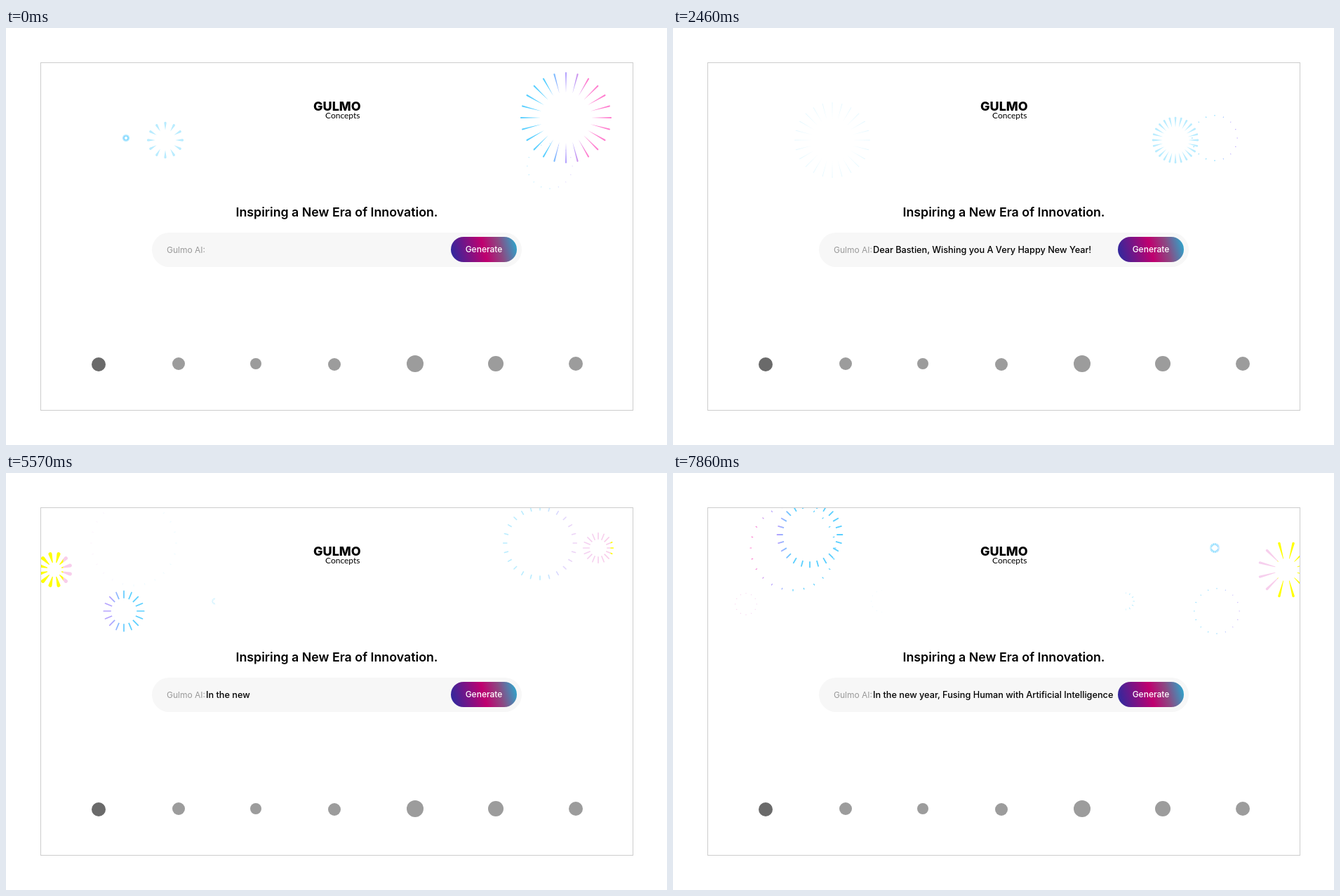
Recreate the animation shown at these times as an HTML page with a canvas. Size 942 by 595 pixels, loop 8000 ms.

```html
<!DOCTYPE html>
<html lang="en">
<head>
<meta charset="utf-8">
<title>Inspiring a New Era of Innovation</title>
<style>
  html, body { margin: 0; width: 100%; height: 100%; overflow: hidden; background: #fff; }
  canvas, svg { position: absolute; left: 0; top: 0; display: block; }
  text { font-family: Inter, sans-serif; font-size: 12px; }
  .title { font-size: 17.8px; font-weight: 600; text-anchor: middle; }
  .hint { fill: #999; }
  .typed { font-size: 12.7px; font-weight: 500; }
  .name { font-size: 18px; font-weight: 800; }
  .sub { font-family: Lato, sans-serif; }
  .button {
    position: absolute; left: 634px; top: 298px; width: 94px; height: 36px;
    border-radius: 18px;
    background: linear-gradient(75deg, #2b2a9f 2%, #c0006f 50%, #8b4a83 73%, #22b0d4 100%);
  }
  .label { fill: #fff; font-weight: 500; text-anchor: middle; }
</style>
</head>
<body>
<canvas id="sky" width="942" height="595"></canvas>
<svg width="942" height="595">
  <rect x="49.5" y="49.5" width="844" height="496" fill="none" stroke="#ccc"/>
  <text class="name" x="438" y="118">GULMO</text>
  <text class="sub" x="455" y="129">Concepts</text>
  <text class="title" x="471.5" y="269">Inspiring a New Era of Innovation.</text>
  <rect x="208" y="292" width="527" height="49" rx="24.5" fill="#f7f7f7"/>
  <text class="hint" x="229" y="321">Gulmo AI:</text>
  <text class="typed" id="typed" x="285" y="321" xml:space="preserve"></text>
  <g fill="#9c9c9c">
    <circle cx="132" cy="480" r="10" fill="#6a6a6a"/>
    <circle cx="246" cy="479" r="9"/>
    <circle cx="356" cy="479" r="8"/>
    <circle cx="468" cy="480" r="9"/>
    <circle cx="583" cy="479" r="12"/>
    <circle cx="698" cy="479" r="11"/>
    <circle cx="812" cy="479" r="10"/>
  </g>
</svg>
<div class="button"></div>
<svg width="942" height="595"><text class="label" x="681" y="320">Generate</text></svg>
<script>
const LOOP = 8000, MIRROR_DELAY = 1540, STAGE = 943;
const LEFT = 50, TOP = 50, SIDE = 248;
const ctx = document.getElementById('sky').getContext('2d');
const typed = document.getElementById('typed');

const GREETING = 'Dear Bastien, Wishing you A Very Happy New Year!';
const PROMISE = 'In the new year, Fusing Human with Artificial Intelligence';
const TYPE_MS = 36.9, ERASE_MS = 40.8;

// Colour depends on where a ray stands, from the outer edge inwards.
function gradient(stops) {
  const g = ctx.createLinearGradient(LEFT, 0, LEFT + SIDE, 0);
  for (const [x, color] of stops) g.addColorStop((x - LEFT) / SIDE, color);
  return g;
}
const vivid = gradient([[116, '#ff80d0'], [134, '#b9a2fb'], [150, '#b3a4ff'], [170, '#5acfff']]);
const soft = gradient([[81, '#ff0'], [82, '#f9cdea'], [125, '#f3d3f3'], [155, '#dcd6ff'], [178, '#b9ecff']]);

// Lengths in px, times in ms; collapse is when the rays have shrunk to dots.
const base = { rays: 24, length: .45, collapse: Infinity, width: 3, taper: 0, turn: 0 };
const ring = { ...base, reach: 62, grow: 1580, life: 3000, collapse: 1600, width: 2.6 };
const spark = { ...base, rays: 16, reach: 33, grow: 450, life: 1650, collapse: 1000, length: .6, width: 2.2 };
const puff = { ...base, rays: 12, reach: 16, grow: 1300, life: 3000, collapse: 1600, width: 1 };
const pin = { ...base, rays: 16, reach: 28, grow: 400, life: 1400, width: 2 };
const petal = { ...base, rays: 12, reach: 55, grow: 2300, life: 2700, length: .6, width: 6.4, taper: .8, turn: .5 };
const flash = { ...base, rays: 12, reach: 40, grow: 260, life: 700, width: 4, taper: 1 };
const bloom = { ...base, reach: 54, grow: 2200, life: 2800, width: 4, taper: 1 };
const grand = { ...bloom, reach: 76, grow: 1500, life: 2400 };

const show = [
  { kind: spark, paint: vivid, x: 168, y: 197, start: -2900 },
  { kind: grand, paint: vivid, x: 145, y: 128, start: -2640 },
  { kind: flash, paint: soft, x: 227, y: 160, start: -110 },
  { kind: spark, paint: vivid, x: 171, y: 157, start: -10 },
  { kind: bloom, paint: soft, x: 227, y: 160, start: 85 },
  { kind: ring, paint: soft, x: 182, y: 100, start: 2870 },
  { kind: pin, paint: soft, x: 99, y: 107, start: 3780 },
  { kind: petal, paint: soft, x: 69, y: 138, start: 5070 },
  { kind: spark, paint: vivid, x: 168, y: 197, start: 5210 },
  { kind: puff, paint: soft, x: 298, y: 183, start: 5450 },
  { kind: ring, paint: vivid, x: 171, y: 107, start: 6300 },
  { kind: puff, paint: soft, x: 104, y: 187, start: 6550 },
  { kind: ring, paint: vivid, x: 195, y: 88, start: 6940 }
];

function drawBurst({ kind, paint, x, y, start }, time) {
  const age = time - start;
  if (age < 0 || age > kind.life) return;
  const left = 1 - age / kind.life;
  const outer = kind.reach * Math.sqrt(Math.min(1, age / kind.grow));
  const inner = outer * (1 - Math.max(.045, kind.length * (1 - age / kind.collapse)));
  const half = Math.min(Math.max(.5, kind.width / 2 * left), 1.2 * outer / kind.rays);
  const tip = Math.max(inner, outer - half);
  const root = half * (1 - kind.taper);

  ctx.globalAlpha = Math.min(1, left / .4);
  ctx.fillStyle = paint;
  ctx.beginPath();
  for (let i = 0; i < kind.rays; i++) {
    const a = (i + kind.turn) / kind.rays * 2 * Math.PI;
    const c = Math.cos(a), s = Math.sin(a);
    ctx.moveTo(x + inner * c - root * s, y + inner * s + root * c);
    ctx.lineTo(x + inner * c + root * s, y + inner * s - root * c);
    ctx.arc(x + tip * c, y + tip * s, half, a - Math.PI / 2, a + Math.PI / 2);
    ctx.closePath();
  }
  ctx.fill();
}

function drawSide(time, mirrored) {
  ctx.save();
  if (mirrored) {
    ctx.translate(STAGE, 0);
    ctx.scale(-1, 1);
  }
  ctx.beginPath();
  ctx.rect(LEFT, TOP, SIDE, SIDE);
  ctx.clip();
  for (const burst of show) drawBurst(burst, time);
  ctx.restore();
}

function textAt(t) {
  const count = (from, step) => Math.max(0, Math.floor((t - from) / step));
  if (t < 3025) return GREETING.slice(0, count(520, TYPE_MS));
  if (t < 5100) return GREETING.slice(0, Math.max(0, GREETING.length - count(3025, ERASE_MS)));
  return PROMISE.slice(0, count(5195, TYPE_MS));
}

function frame() {
  const t = performance.now() % LOOP;
  ctx.clearRect(0, 0, 942, 595);
  drawSide(t, false);
  drawSide(t - MIRROR_DELAY, true);
  typed.textContent = textAt(t);
  requestAnimationFrame(frame);
}
frame();
</script>
</body>
</html>
```
